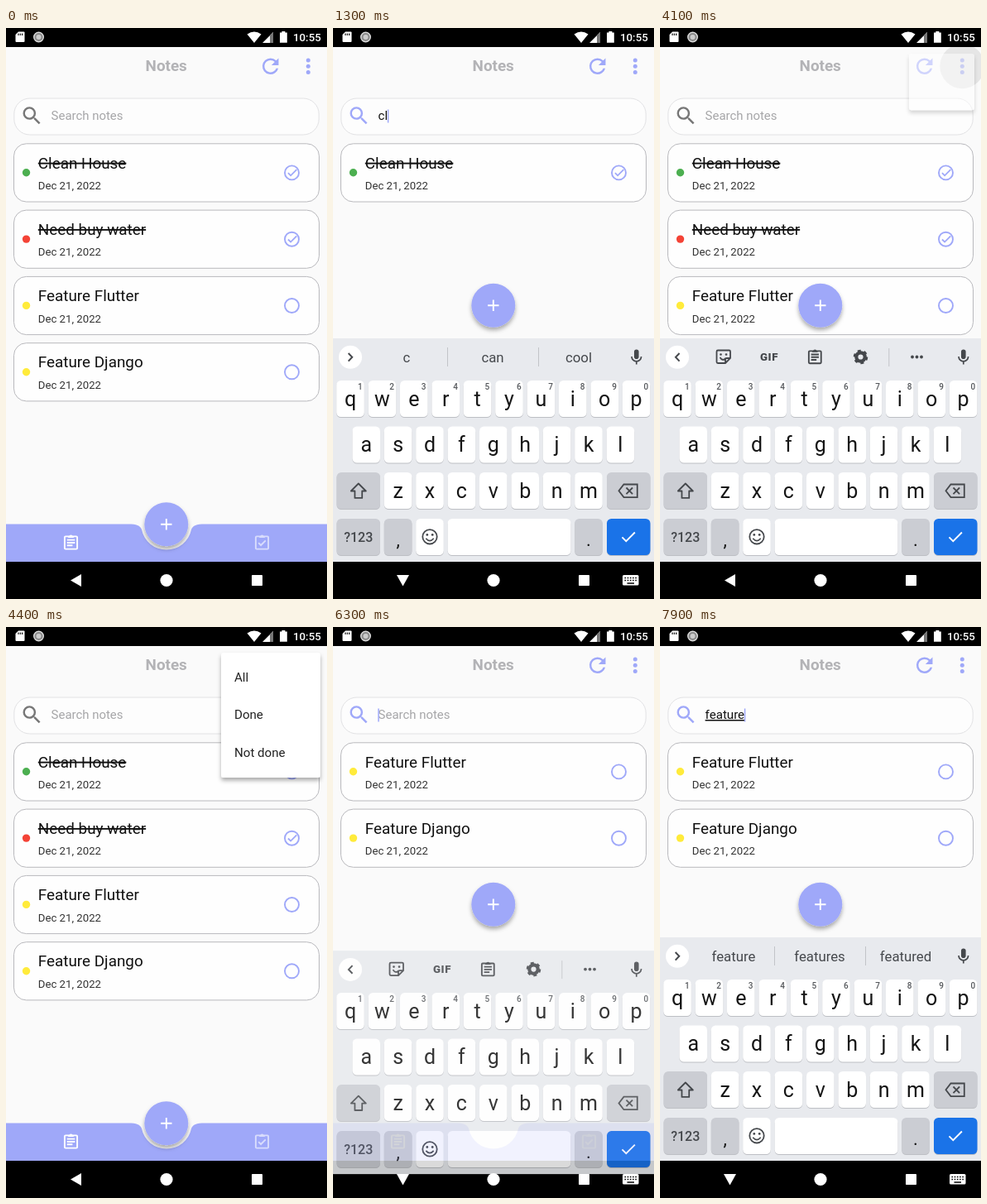
An HTML page for the animation above (8000 ms loop, 388 px wide and 690 px high).

```html
<!DOCTYPE html>
<html lang="en">
<head>
<meta charset="utf-8">
<title>Notes</title>
<style>
  html, body { margin: 0; width: 100%; height: 100%; overflow: hidden; background: #fafafa; }
  svg { display: block; }
  text { font-family: Roboto, "Open Sans", sans-serif; white-space: pre; }
  .mid { text-anchor: middle; }
  .done { text-decoration: line-through; }
</style>
</head>
<body>
<svg id="stage" width="388" height="690" viewBox="0 0 388 690"></svg>
<script>
const LOOP = 8000;
const ACCENT = '#9fa8f9';
const INK = '#45484c';
const stage = document.getElementById('stage');

// Markup helpers
const rect = (x, y, w, h, r, fill, more = '') =>
  `<rect x="${x}" y="${y}" width="${w}" height="${h}" rx="${r}" fill="${fill}" ${more}/>`;
const circle = (x, y, r, fill, more = '') =>
  `<circle cx="${x}" cy="${y}" r="${r}" fill="${fill}" ${more}/>`;
const line = (d, color, w, more = '') =>
  `<path d="${d}" fill="none" stroke="${color}" stroke-width="${w}" ${more}/>`;
const text = (x, y, size, fill, str, more = '') =>
  `<text x="${x}" y="${y}" font-size="${size}" fill="${fill}" ${more}>${str}</text>`;
const group = (id, body, more = '') => `<g id="${id}" ${more}>${body}</g>`;
// Icon drawn on a 24-unit grid, centred on x, y
const icon = (x, y, scale, body, more = '') =>
  `<g transform="translate(${x} ${y}) scale(${scale}) translate(-12 -12)" ${more}>${body}</g>`;

const SEARCH = 'M15.5 14h-.79l-.28-.27A6.47 6.47 0 0 0 16 9.5 6.5 6.5 0 1 0 9.5 16c1.61 0 3.09-.59 4.23-1.57l.27.28v.79l5 4.99L20.49 19zm-6 0a4.5 4.5 0 1 1 0-9 4.5 4.5 0 0 1 0 9z';
const REFRESH = 'M17.65 6.35A7.96 7.96 0 0 0 12 4a8 8 0 1 0 7.73 10h-2.08A6 6 0 1 1 12 6c1.66 0 3.14.69 4.22 1.78L13 11h7V4z';
const clipboard = (color, inner) =>
  rect(4, 4, 16, 16, 1.2, 'none', `stroke="${color}" stroke-width="2"`) +
  `<path d="M8.5 4h1a2.6 2.6 0 0 1 5 0h1v1.6h-7z" fill="${color}"/>` + line(inner, color, 2);
const LINES = 'M7 8.5H17M7 12H17M7 15.5H14';
const TICK = 'M7.5 12.2l3 3 6-6';

const notes = [
  ['Clean House', '#4caf50', true],
  ['Need buy water', '#f44336', true],
  ['Feature Flutter', '#ffeb3b', false],
  ['Feature Django', '#ffeb3b', false],
];

const card = ([title, color, done], i) => group('note' + i,
  rect(9.5, 139.8, 369, 70.2, 15, '#fefefe', 'stroke="#b9b9bd"') +
  circle(24.5, 174.8, 4.7, color) +
  text(38.8, 169.6, 18.88, '#111', title, done ? 'class="done"' : '') +
  text(38.8, 195.2, 13.2, '#333', 'Dec 21, 2022') +
  circle(345.5, 174.9, 8.5, 'none', `stroke="${ACCENT}" stroke-width="1.9"`) +
  (done ? line('M341 175.2l3.1 3.1 7.2-7.2', ACCENT, 1.8) : ''));

const statusBar = () => rect(0, 0, 388, 23, 0, '#000') +
  '<path d="M15 4.5h6.5a1 1 0 0 1 1 1V16a1 1 0 0 1-1 1h-9a1 1 0 0 1-1-1V8z" fill="#fff"/>' +
  line('M15 6.5v2.6M17.3 6.5v2.6M19.6 6.5v2.6', '#000', 1.1) +
  circle(39.5, 11, 5.8, '#888', 'stroke="#ddd" stroke-width="1.4"') + circle(39.5, 11, 3, '#ccc') +
  '<path d="M291.5 7.5q8.5-6 17 0L300 18zM323 5v13h-13z" fill="#fff"/>' +
  '<path d="M319 9v9h4V5z" fill="#777"/>' +
  '<path d="M331 5.5h2.4V4h4v1.5h2.4v12.2H331z" fill="#fff"/>' +
  text(347, 16, 13.3, '#fff', '10:55', 'font-weight="500"');

const header = () =>
  text(193.7, 52.4, 18.88, '#b3b3b6', 'Notes', 'class="mid" font-weight="700"') +
  icon(319.7, 46.2, 1.22, `<path d="${REFRESH}" fill="${ACCENT}"/>`) +
  [39, 46.2, 53.4].map(y => circle(365.3, y, 2.5, ACCENT)).join('');

const searchBox = () =>
  rect(9.8, 85, 368.4, 44, 19, '#fdfdfd', 'stroke="#e2e2e4"') +
  icon(31.3, 106, 1.2, `<path id="lens" d="${SEARCH}"/>`) +
  text(54.6, 111, 14.95, '#a6a6a8', 'Search notes', 'id="hint"') +
  text(54.6, 111, 15.1, '#111', '', 'id="query"') +
  rect(0, 98.5, 1.5, 16, 0, ACCENT, 'id="caret"');

const bottomBar = () =>
  `<path fill="${ACCENT}" d="M0 599.5H148C158 599.5 162 601 164 606A30.6 30.6 0 0 0 224 606C226 601 230 599.5 240 599.5H388V645H0Z"/>` +
  icon(78.5, 622, 0.95, clipboard('#fff', LINES)) +
  icon(309.5, 622, 0.95, clipboard('#fff', TICK), 'opacity=".6"');

const fab = () => group('fab',
  circle(0, 0, 26.5, ACCENT, 'filter="url(#shade)"') +
  line('M-6.7 0H6.7M0-6.7V6.7', '#fff', 1.9));

// Keyboard
const key = (x, y, w, fill, body = '') =>
  rect(x, y + 1, w, 44, 5.5, '#bdbfc4') + rect(x, y, w, 44, 5.5, fill) + body;
const GREY = '#cbcdd3';
const letters = (row, x0, y, digits) => [...row].map((c, i) => {
  const x = x0 + i * 38.4;
  return key(x - 16.8, y, 33.6, '#fff', text(x, y + 30.5, 25, '#151515', c, 'class="mid"') +
    (digits ? text(x + 11.8, y + 11.3, 10, '#55585c', (i + 1) % 10, 'class="mid" font-weight="500"') : ''));
}).join('');

const gear = () => circle(242.5, 397.5, 5.2, 'none', `stroke="${INK}" stroke-width="4.2"`) +
  circle(242.5, 397.5, 7.6, 'none', `stroke="${INK}" stroke-width="2.4" stroke-dasharray="4 3.96"`);

const tools = () => group('tools',
  line('M23.5 393l-4.6 4.8 4.6 4.8', INK, 2) +
  line('M70 389.5h13.5q1.5 0 1.5 1.5v8l-6 6H70q-1.5 0-1.5-1.5V391q0-1.5 1.5-1.5zM79 405v-4.5q0-1.5 1.5-1.5H85M72.5 398q3 5 7 1', INK, 1.8) +
  circle(73.5, 394.5, 1.3, INK) + circle(80, 394.5, 1.3, INK) +
  text(132, 402.3, 13.2, INK, 'GIF', 'class="mid" font-weight="900" letter-spacing=".6"') +
  icon(187.3, 397.8, 0.93, clipboard(INK, LINES)) + gear() +
  line('M276.8 387V409', '#c2c4c8', 1) +
  [305, 310.5, 316].map(x => circle(x, 397.5, 1.9, INK)).join(''));

const words = () => group('words',
  line('M18.6 393l4.6 4.8-4.6 4.8', INK, 2) +
  line('M138.5 386V409M248.5 386V409', '#c2c4c8', 1) +
  [89, 193, 297].map((x, i) => text(x, 403.6, 16.8, INK, '', `class="mid" id="word${i}"`)).join(''));

const keyboard = () => group('kb',
  rect(0, 375, 388, 270, 0, '#e8eaee') +
  circle(21, 397.8, 14, '#fff') + tools() + words() +
  rect(364, 388.5, 5.6, 11.5, 2.8, INK) + line('M361 397a5.8 5.8 0 0 0 11.6 0M366.8 403v3.6', INK, 1.7) +
  letters('qwertyuiop', 21, 426, true) +
  letters('asdfghjkl', 40.2, 481.5) +
  letters('zxcvbnm', 78.6, 537) +
  key(4.5, 537, 52.5, GREY, line('M30.8 550.5l9 9h-4.6v8.4h-8.8v-8.4h-4.6z', INK, 1.8, 'stroke-linejoin="round"')) +
  key(331, 537, 52.5, GREY, line('M351.5 551.5h16.3v15.6h-16.3l-6-7.8zM354.5 555.5l7.6 7.6M362.1 555.5l-7.6 7.6', INK, 1.8)) +
  key(4.5, 593, 52.5, GREY, text(30.7, 621, 16, INK, '?123', 'class="mid" font-weight="500"')) +
  key(61.8, 593, 33.6, GREY, text(78.6, 626, 22, '#151515', ',', 'class="mid"')) +
  key(100.2, 593, 33.6, '#fff', circle(117, 614.8, 8.7, 'none', `stroke="${INK}" stroke-width="1.8"`) +
    circle(113.8, 612.4, 1.4, INK) + circle(120.2, 612.4, 1.4, INK) + line('M112.3 616.8q4.7 5.6 9.4 0', INK, 1.7)) +
  key(138.6, 593, 148.8, '#fff') +
  key(292.2, 593, 33.6, GREY, text(309, 626, 22, '#151515', '.', 'class="mid"')) +
  key(331, 593, 52.5, '#1a73e8', line('M349.5 615.3l4.8 4.8 10.6-10.6', '#fff', 1.9)));

const navBar = () =>
  '<path id="back" d="M78 667.5L91 660V675Z" fill="#fff"/><path id="down" d="M77 661H92L84.5 674.5Z" fill="#fff"/>' +
  circle(194, 667.5, 7.6, '#fff') + rect(297, 661, 13, 13, 0.8, '#fff') +
  group('switcher', rect(350, 661, 19.5, 12.5, 1.6, '#fff') +
    line('M352.5 664.4H367.5M352.5 667.4H367.5', '#000', 1.5, 'stroke-dasharray="1.6 1.6"') +
    line('M355.5 671H364', '#000', 1.5));

const menu = () =>
  circle(365.3, 46.2, 27, '#000', 'id="ripple"') +
  group('menu', rect(0, 0, 1, 1, 3, '#fff', 'id="panel" filter="url(#shade)"') +
    group('items', ['All', 'Done', 'Not done'].map((s, i) => text(276, 66 + i * 45.3, 15.1, '#222', s)).join('')));

stage.innerHTML =
  '<defs><filter id="shade" x="-30%" y="-30%" width="160%" height="170%"><feDropShadow dx="0" dy="3.5" stdDeviation="2.8" flood-opacity=".32"/></filter></defs>' +
  rect(0, 0, 388, 690, 0, '#fafafa') + header() + searchBox() + notes.map(card).join('') +
  bottomBar() + fab() + rect(0, 645, 388, 45, 0, '#000') + keyboard() + navBar() + menu() + statusBar();

const el = {};
stage.querySelectorAll('[id]').forEach(n => el[n.id] = n);
const set = (id, attrs) => { for (const k in attrs) el[id].setAttribute(k, attrs[k]); };
const show = (id, on) => set(id, { visibility: on ? 'visible' : 'hidden' });

// Timing helpers
const clamp = v => Math.max(0, Math.min(1, v));
const part = (t, start, len) => clamp((t - start) / len);
const between = (t, a, b) => t >= a && t < b;
const outCubic = p => 1 - (1 - p) ** 3;
const bez = (s, a, b) => 3 * a * s * (1 - s) ** 2 + 3 * b * s * s * (1 - s) + s ** 3;
function ease(x) {
  let lo = 0, hi = 1;
  for (let i = 0; i < 20; i++) {
    const m = (lo + hi) / 2;
    if (bez(m, .25, .25) < x) lo = m; else hi = m;
  }
  return bez(lo, .1, 1);
}
const latest = (table, t) => table.filter(row => row[0] <= t).pop();

const typed = [
  [0, ''], [1000, 'c'], [1250, 'cl'], [1400, 'cle'], [1500, 'clea'], [1600, 'clean'],
  [1900, 'clea'], [2100, 'cle'], [2300, 'cl'], [2450, 'c'], [2600, ''],
  [6700, 'f'], [6850, 'fe'], [7000, 'fea'], [7500, 'feat'], [7600, 'featu'], [7700, 'featur'], [7800, 'feature'],
];
const hints = [
  [0, ''], [1100, 'c can cool'], [1400, 'clean clear close'], [1650, 'clean cleaning cleaned'],
  [2350, 'c can cool'], [2650, ''], [6800, 'f for from'], [7100, 'fear feat feature'],
  [7600, 'feature features feat'], [7850, 'feature features featured'],
];

function drawNotes(t) {
  const filtered = between(t, 1000, 2670), open = t >= 5100;
  const slide = ease(open ? part(t, 5190, 500) : t < 2670 ? 1 : part(t, 2670, 500));
  notes.forEach((n, i) => {
    const visible = open ? !n[2] : !filtered || i === 0;
    const p = i === 0 ? 1 : slide;
    const slot = open ? i - 2 : i;
    show('note' + i, visible);
    set('note' + i, { transform: `translate(${388 * (1 - p)} ${slot * 80.3})`, opacity: p });
  });
}

function drawSearch(t, focus) {
  const str = latest(typed, t)[1];
  set('lens', { fill: focus ? ACCENT : '#777' });
  show('hint', !str);
  el.query.textContent = str;
  const settled = between(t, 1400, 2400) || t >= 6800;
  el.query.style.textDecoration = settled ? 'underline' : 'none';
  set('caret', { x: 54.3 + (str ? el.query.getComputedTextLength() : 0) });
  show('caret', focus && !between(t, 3000, 3500));
}

function drawKeyboard(t) {
  const shown = t < 4150 ? part(t, 80, 200) : t < 6240 ? 1 - part(t, 4150, 200) : part(t, 6240, 200);
  set('kb', { transform: `translate(0 ${48 * (1 - outCubic(shown))})`, opacity: clamp(shown * 2.8) });
  const list = latest(hints, t)[1];
  el.tools.style.display = list ? 'none' : '';
  el.words.style.display = list ? '' : 'none';
  if (list) list.split(' ').forEach((w, i) => el['word' + i].textContent = w);
}

function drawMenu(t) {
  const grow = outCubic(part(t, 4070, 260));
  const fade = 1 - part(t, 5000, 150);
  show('menu', between(t, 4070, 5150));
  set('menu', { opacity: fade * Math.min(1, part(t, 4050, 100)) });
  const w = 60 + 60 * grow, h = 30 + 121 * grow;
  set('panel', { x: 380 - w, y: 31, width: w, height: h });
  set('items', { opacity: part(t, 4180, 150) });
  set('ripple', { opacity: .08 * part(t, 4040, 50) * (1 - part(t, 4150, 200)) });
}

function draw(t) {
  const focus = between(t, 80, 4050) || t >= 6240;
  const raised = between(t, 80, 4200) || t >= 6240;
  drawNotes(t);
  drawSearch(t, focus);
  drawKeyboard(t);
  drawMenu(t);
  set('fab', { transform: `translate(193.8 ${raised ? 335.2 : 599.7})` });
  show('back', !focus);
  show('down', focus);
  show('switcher', focus);
}

const begin = performance.now();
function tick() {
  draw((performance.now() - begin) % LOOP);
  requestAnimationFrame(tick);
}
tick();
</script>
</body>
</html>
```
